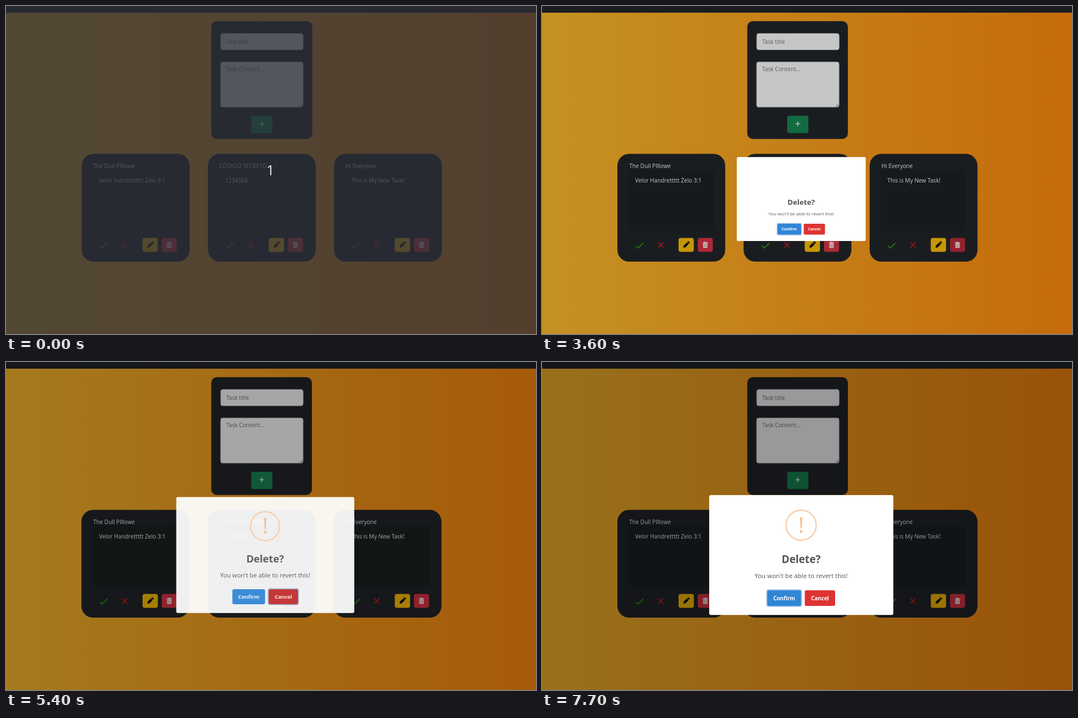
Animation, 951 px wide and 589 px high, one loop 8000 ms. Source, as an HTML page with a canvas:

```html
<!DOCTYPE html>
<html lang="en">
<head>
<meta charset="utf-8">
<title>Task board</title>
<style>
  html, body { margin: 0; width: 100%; height: 100%; overflow: hidden; background: #212529; }
  canvas { display: block; }
</style>
</head>
<body>
<canvas id="stage" width="951" height="589"></canvas>
<script>
const ctx = document.getElementById('stage').getContext('2d');
const W = 951, H = 589, LOOP = 8000, TICK = 100;
const FONT = '"Open Sans", "Noto Sans", sans-serif';
const DARK = '#212529';
const OPENINGS = [3600, 7200];
const CLOSE_AT = 5388;
const CARDS = [
  { x: 136, title: 'The Dull PIllowe', body: 'Velor Handrettttt Zelo 3:1' },
  { x: 362.4, title: 'CODIGO SECRETO', body: '1234568' },
  { x: 588.6, title: 'Hi Everyone', body: 'This is My New Task!' }
];

const clamp = v => Math.min(1, Math.max(0, v));
const mix = (a, b, k) => a + (b - a) * k;
const within = (t, from, to) => t >= from && t < to;

// CSS "ease" timing: cubic-bezier(.25, .1, .25, 1)
function ease(p) {
  p = clamp(p);
  let lo = 0, hi = 1;
  for (let i = 0; i < 20; i++) {
    const s = (lo + hi) / 2, r = 1 - s;
    if (0.75 * r * s + s * s * s < p) lo = s; else hi = s;
  }
  const s = lo, r = 1 - s;
  return 0.3 * r * r * s + 3 * r * s * s + s * s * s;
}

// Eased interpolation through [position, value] stops
function keyframes(stops, p) {
  p = clamp(p);
  const i = Math.max(1, stops.findIndex(s => p <= s[0]));
  const [p0, v0] = stops[i - 1], [p1, v1] = stops[i];
  return mix(v0, v1, ease((p - p0) / (p1 - p0)));
}

function box(x, y, w, h, r, fill, stroke) {
  ctx.beginPath();
  ctx.roundRect(x, y, w, h, r);
  ctx.fillStyle = fill;
  ctx.fill();
  if (stroke) {
    ctx.strokeStyle = stroke;
    ctx.lineWidth = 0.8;
    ctx.stroke();
  }
}

function text(str, x, y, size, color, weight = 400, align = 'left') {
  ctx.font = `${weight} ${size}px ${FONT}`;
  ctx.textAlign = align;
  ctx.fillStyle = color;
  ctx.fillText(str, x, y);
}

function line(points, color, width) {
  ctx.beginPath();
  points.forEach(([x, y]) => ctx.lineTo(x, y));
  ctx.strokeStyle = color;
  ctx.lineWidth = width;
  ctx.stroke();
}

function drawBackground() {
  const g = ctx.createLinearGradient(0, 0, W, 0);
  g.addColorStop(0, '#fdbb2d');
  g.addColorStop(1, '#ff8a0f');
  ctx.fillStyle = g;
  ctx.fillRect(0, 0, W, H);
  ctx.fillStyle = DARK;
  ctx.fillRect(0, 0, W, 12);
}

function drawForm(shift) {
  box(368.3, 27.3, 181.3 - shift, 211.5, 10, DARK);
  box(385.2, 49.3, 148, 29.4, 4, '#fff', '#ced4da');
  box(384.9, 100.3, 148.3, 81.5, 4, '#fff', '#9a9da0');
  text('Task title', 395, 67.7, 10.1, '#6c757d');
  text('Task Content...', 395, 117, 10.1, '#6c757d');
  line([[526.5, 181], [532, 175.5]], '#555', 0.8);
  line([[529.5, 181], [532, 178.5]], '#555', 0.8);
  box(440, 197, 38, 31.2, 4, '#198754');
  line([[454.6, 211.5], [463.4, 211.5]], '#fff', 1.3);
  line([[459, 207.1], [459, 215.9]], '#fff', 1.3);
}

function drawPencil(x, y) {
  ctx.save();
  ctx.translate(x, y);
  ctx.rotate(-Math.PI / 4);
  ctx.fillStyle = '#0b0b0b';
  ctx.beginPath();
  ctx.moveTo(-7.6, 0);
  ctx.lineTo(-4.6, -2.2);
  ctx.lineTo(3.4, -2.2);
  ctx.lineTo(3.4, 2.2);
  ctx.lineTo(-4.6, 2.2);
  ctx.fill();
  ctx.beginPath();
  ctx.roundRect(4.2, -2.2, 2.8, 4.4, 1);
  ctx.fill();
  ctx.restore();
}

function drawTrash(x, y) {
  box(x - 4.6, y - 4.4, 9.2, 1.5, 0.5, '#fff');
  box(x - 1.8, y - 5.4, 3.6, 1.5, 0.5, '#fff');
  box(x - 3.9, y - 2.4, 7.8, 7.8, [0, 0, 1.3, 1.3], '#fff');
  for (const dx of [-2, 0, 2]) {
    line([[x + dx, y - 1.2], [x + dx, y + 4.2]], '#dc3545', 0.65);
  }
}

function drawCard({ x, title, body }, shift, hover) {
  box(x - shift, 265.5, 193.5, 193.6, 21, DARK);
  box(x + 20.4, 294.6, 152, 109.6, 4, '#1d2124');
  text(title, x + 20.5, 291.2, 10.1, '#fff');
  text(body, x + 31, 317.2, 10.1, '#fff');
  line([[x + 32, 430.6], [x + 36.4, 434.8], [x + 45.6, 425.8]], '#2c9a12', 1.9);
  line([[x + 72.4, 424.6], [x + 81.6, 433.8]], '#c4201a', 1.8);
  line([[x + 81.6, 424.6], [x + 72.4, 433.8]], '#c4201a', 1.8);
  box(x + 109, 416.4, 27.4, 25, 4, '#ffc107');
  drawPencil(x + 123, 428.6);
  box(x + 143.5, 416.4, 27, 25, 4, hover ? '#bb2d3b' : '#dc3545');
  drawTrash(x + 157, 429);
}

function drawIcon(age) {
  const p = age / 500;
  const turn = mix(100, 0, ease(p)) * Math.PI / 180;
  const alpha = ctx.globalAlpha * ease(p);
  ctx.save();
  ctx.translate(465, 293);
  ctx.scale(1, Math.cos(turn));
  ctx.globalAlpha = alpha;
  ctx.beginPath();
  ctx.arc(0, 0, 27, 0, Math.PI * 2);
  ctx.strokeStyle = '#facea8';
  ctx.lineWidth = 2.5;
  ctx.stroke();
  const tilt = keyframes([[0, 45], [0.25, -25], [0.5, 15], [0.75, -5], [1, 0]], p);
  ctx.rotate(tilt * Math.PI / 180);
  ctx.globalAlpha = alpha * keyframes([[0, 0], [0.25, 0.4], [0.5, 0.8], [0.75, 1], [1, 1]], p);
  text('!', 0, 13.8, 39, '#f8bb86', 400, 'center');
  ctx.restore();
}

function drawDialog(age, leave, cancelHover, cancelFocus) {
  const enter = keyframes([[0, 0.7], [0.45, 1.05], [0.8, 0.95], [1, 1]], age / 300);
  const scale = enter * mix(1, 0.5, leave);
  ctx.save();
  ctx.translate(465.2, 346.6);
  ctx.scale(scale, scale);
  ctx.translate(-465.2, -346.6);
  ctx.globalAlpha = 1 - leave;
  box(300, 239, 330.4, 215.3, 3, '#fff');
  drawIcon(age);
  text('Delete?', 465, 360.8, 18.8, '#545454', 700, 'center');
  text("You won't be able to revert this!", 465, 388.2, 11.4, '#545454', 400, 'center');
  if (cancelFocus) box(469.5, 408, 58.5, 32, 4.5, 'rgba(100,150,200,.5)');
  else box(402.2, 408, 64.6, 32, 4.5, 'rgba(100,150,200,.5)');
  box(404.2, 410, 60.6, 28, 3, '#3085d6');
  box(471.5, 410, 54.5, 28, 3, cancelHover ? '#c62e2e' : '#dd3333');
  text('Confirm', 434.5, 427.7, 9.7, '#fff', 700, 'center');
  text('Cancel', 498.8, 427.7, 9.7, '#fff', 700, 'center');
  ctx.restore();
}

function drawCountdown() {
  ctx.fillStyle = 'rgba(40,44,54,.8)';
  ctx.fillRect(0, 0, W, H);
  text('1', 474.5, 303.5, 26, '#e4e4e4', 400, 'center');
}

function render(t) {
  const opened = t >= OPENINGS[1] ? OPENINGS[1] : OPENINGS[0];
  const dialog = t >= OPENINGS[1] || within(t, OPENINGS[0], 5600);
  const closing = opened === OPENINGS[0] && t > CLOSE_AT;
  const leave = closing ? ease((t - CLOSE_AT) / 150) : 0;
  const shift = dialog ? 0.7 : 0;
  const hovers = [
    false,
    within(t, 900, 1000) || within(t, 6200, 6300),
    within(t, 2900, 3700) || within(t, 6700, 7300)
  ];

  drawBackground();
  drawForm(shift);
  CARDS.forEach((card, i) => drawCard(card, shift, hovers[i]));

  if (dialog) {
    const age = t - opened;
    const shown = mix(0.56, 1, ease(age / 100));
    const hidden = closing ? ease((t - CLOSE_AT) / 100) : 0;
    ctx.fillStyle = `rgba(0,0,0,${0.4 * shown * (1 - hidden)})`;
    ctx.fillRect(0, 0, W, H);
    drawDialog(age, leave, within(t, 4600, 5600), within(t, 5300, 5600));
  }
  if (t < 100) drawCountdown();
}

const start = performance.now();
function tick() {
  const t = (performance.now() - start) % LOOP;
  render(Math.floor(t / TICK) * TICK);
  requestAnimationFrame(tick);
}
tick();
</script>
</body>
</html>
```
